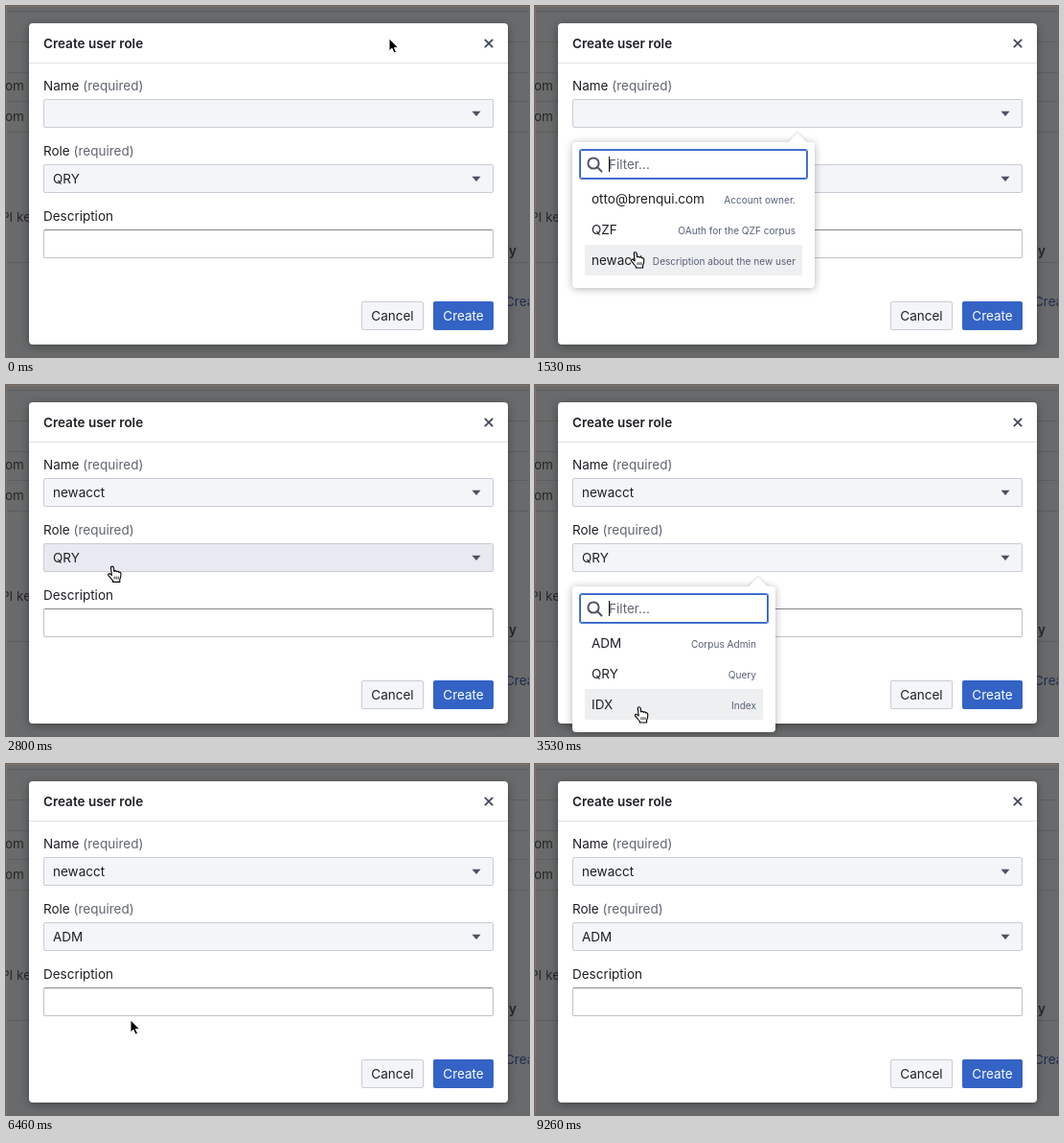
Animation of 546x366 px, one loop 9.43 s. Source, as an HTML page:

```html
<!DOCTYPE html>
<html lang="en">
<head>
<meta charset="utf-8">
<title>Create user role</title>
<style>
  html, body { margin: 0; width: 100%; height: 100%; overflow: hidden; }
  body { position: relative; background: #696a6b; font: 13.5px Inter, "Liberation Sans", sans-serif; color: #1d1f24; cursor: default; }
  div { position: absolute; box-sizing: border-box; white-space: nowrap; }
  svg { position: absolute; overflow: visible; }
  .rule { left: 0; width: 546px; height: 1px; background: #5d5e60; }
  .edge { background: #86705f; }
  .back { color: #26272a; }
  .link { color: #1c2c54; }
  .modal { background: #fff; border-radius: 4px; box-shadow: 0 2px 10px rgba(0,0,0,.35); }
  .line { background: #dfe1e6; }
  .bold { font-weight: 600; }
  .soft { color: #5f6470; }
  .select, .cancel { background: #f3f5f8; border: 1px solid #c8ccd5; border-radius: 2px; }
  .select { padding-left: 9px; }
  .select.hover, .cancel.hover { background: #e9eaf1; }
  .input { background: #fff; border: 1px solid #bfc1c5; border-top-color: #85878b; border-radius: 2px; }
  .cancel, .create { text-align: center; border-radius: 2px; }
  .create { background: #3463c6; color: #fff; }
  .create.hover { background: #2b4fa2; }
  .popup { background: #fff; border-radius: 4px; box-shadow: 0 1px 9px rgba(0,0,0,.3); }
  .tip { width: 14px; height: 14px; background: #fff; transform: rotate(45deg); box-shadow: -1px -1px 2px rgba(0,0,0,.13); }
  .cover { background: #fff; }
  .filter { border: 1px solid #bfc3cc; border-radius: 2px; padding-left: 29px; color: #62666f; }
  .filter.focus { border-color: #3564c8; box-shadow: 0 0 0 1px #4c78d4; }
  .caret { background: #111; }
  .row { padding-left: 7px; border-radius: 1px; }
  .row.hover { background: #eeeff1; }
  .note { right: 7px; top: 1px; font-size: 10.1px; color: #566079; }
</style>
</head>
<body>
<script>
const LOOP = 9430;
const NAME = 'newacct';

function box(parent, cls, x, y, w, h, text = '') {
  const el = document.createElement('div');
  el.className = cls;
  el.style.cssText = `left:${x}px;top:${y}px;width:${w}px;height:${h}px;line-height:${h}px`;
  el.textContent = text;
  parent.append(el);
  return el;
}

// Text centred vertically on cy
const label = (parent, cls, x, cy, text) => box(parent, cls, x, cy - 10, 200, 20, text);

function svg(parent, x, y, inner) {
  const el = document.createElementNS('http://www.w3.org/2000/svg', 'svg');
  el.setAttribute('width', 20);
  el.setAttribute('height', 20);
  el.style.left = x + 'px';
  el.style.top = y + 'px';
  el.innerHTML = inner;
  parent.append(el);
  return el;
}

const page = document.body;

// Dimmed page behind the dialog
for (const y of [5, 37, 69, 99, 131, 267]) box(page, 'rule', 0, y, 546, 1);
box(page, 'edge', 0, 0, 546, 1);
box(page, 'edge', 0, 0, 1, 366);
label(page, 'back', -1, 83, 'om');
label(page, 'back', -1, 115, 'om');
label(page, 'back', -5, 220, 'PI key');
label(page, 'back bold', 525, 255, 'y');
label(page, 'back link', 521, 308, 'Create');

// Dialog
box(page, 'modal', 24, 18, 500, 335);
box(page, 'line', 24, 59, 500, 1);
label(page, 'bold', 39, 39, 'Create user role');
svg(page, 504, 39, '<path d="M-4.2-4.2 4.2 4.2M4.2-4.2-4.2 4.2" stroke="#3c4456" stroke-width="1.7"/>');

function field(cy, text) {
  const el = label(page, '', 39, cy, text + ' ');
  const req = document.createElement('span');
  req.className = 'soft';
  req.textContent = '(required)';
  el.append(req);
  const control = box(page, 'select', 39, cy + 14, 470, 30);
  control.style.lineHeight = '28px';
  svg(page, 491, cy + 29, '<path d="M-4.5-2.3H4.5L0 2.9Z" fill="#4b5160"/>');
  return control;
}
const nameBox = field(83, 'Name');
const roleBox = field(151, 'Role');
label(page, '', 39, 219, 'Description');
box(page, 'input', 39, 233, 470, 30);
const cancel = box(page, 'cancel', 371, 308, 65, 30, 'Cancel');
cancel.style.lineHeight = '28px';
const create = box(page, 'create', 446, 308, 63, 30, 'Create');

function popup(y, w, items) {
  const el = box(page, 'popup', 39, y, w, 152);
  box(el, 'tip', w - 25, -7, 14, 14);
  box(el, 'cover', w - 32, 0, 28, 14);
  const filter = box(el, 'filter focus', 8, 8, w - 16, 30, 'Filter...');
  filter.style.lineHeight = '28px';
  svg(el, 22, 22, '<g fill="none" stroke="#4d5464" stroke-width="2"><circle r="5.6"/><path d="M4 4 8.5 8.5" stroke-linecap="round"/></g>');
  const caret = box(el, 'caret', 38, 15, 1, 16);
  const rows = items.map(([text, note], i) => {
    const row = box(el, 'row', 13, 43 + 32 * i, w - 26, 32, text);
    const n = document.createElement('div');
    n.className = 'note';
    n.textContent = note;
    row.append(n);
    return row;
  });
  return { el, filter, caret, rows, y, w };
}
const names = popup(142, 253, [
  ['otto@brenqui.com', 'Account owner.'],
  ['QZF', 'OAuth for the QZF corpus'],
  [NAME, 'Description about the new user'],
]);
const roles = popup(210, 212, [['ADM', 'Corpus Admin'], ['QRY', 'Query'], ['IDX', 'Index']]);

// Pointers, with the hot spot at 0,0
const ink = 'stroke-linejoin="round" stroke-linecap="round"';
const arrow = svg(page, 0, 0,
  `<path d="M0 0V13L3 10.2 5.1 15 7.5 14 5.4 9.4H9.4Z" fill="#000" stroke="#fff" stroke-width="1" ${ink}/>`);
const hand = svg(page, 0, 0,
  `<path d="M-1.7 1C-1.7-.7 1-.7 1.2 1L1.7 5C2.2 3.9 4 4 4.2 5.3 4.8 4.4 6.4 4.7 6.6 6 7.4 5.4 8.8 5.9 8.8 7.4
  C8.9 10 8.6 11.4 7.6 13.4V16H.4V14.6C-1.3 13-2.6 10.8-4.2 9.2-5.3 7.8-3.6 6.6-2.2 7.8L-.8 9Z"
  fill="#fff" stroke="#000" stroke-width="1.1" ${ink}/><path d="M2 10.2V13.2M4 10.2V13.2M6 10.2V13.2" stroke="#000" stroke-width=".8"/>`);

// time, x, y
const path = [
  [0, 400, 34], [30, 400, 34], [930, 190, 114], [1060, 190, 114],
  [1500, 105, 257], [1760, 105, 257], [1930, 106, 262], [2030, 106, 262],
  [2750, 111, 190], [2930, 112, 187], [3030, 112, 187], [3500, 109, 336],
  [3760, 109, 337], [3960, 109, 337], [4400, 112, 302], [4900, 118, 270],
  [5060, 118, 270], [5230, 131, 247], [5660, 130, 267], [6860, 130, 267],
  [7460, 472, 308.5], [7730, 475, 317], [7830, 475, 317], [8160, 476, 321], [LOOP, 476, 321],
];

function pointer(t) {
  const i = path.findIndex(p => p[0] > t);
  const [t0, x0, y0] = path[i - 1], [t1, x1, y1] = path[i];
  const u = (t - t0) / (t1 - t0), k = u * u * (3 - 2 * u);
  return [x0 + (x1 - x0) * k, y0 + (y1 - y0) * k];
}

const within = (t, a, b) => t >= a && t < b;

function draw(t) {
  const [x, y] = pointer(t);
  const shown = t < 9100;
  const open = within(t, 1030, 1930) ? names : within(t, 3000, 6460) ? roles : null;
  const over = (l, top, w, h) => shown && within(x, l, l + w) && within(y, top, top + h);
  const inPopup = open && over(39, open.y, open.w, 152);
  let active = false;
  const hover = (el, on) => {
    el.classList.toggle('hover', !!on);
    active = active || on;
  };

  nameBox.textContent = t < 1930 ? '' : NAME;
  roleBox.textContent = t < 6460 ? 'QRY' : 'ADM';
  hover(nameBox, !inPopup && over(39, 97, 470, 30));
  hover(roleBox, !inPopup && over(39, 165, 470, 30));
  hover(cancel, !inPopup && over(371, 308, 65, 30));
  hover(create, !inPopup && over(446, 308, 63, 30));

  for (const p of [names, roles]) {
    p.el.style.display = p === open ? 'block' : 'none';
    p.rows.forEach((row, i) => hover(row, p === open && over(52, p.y + 43 + 32 * i, p.w - 26, 32)));
  }
  // Pressing a row takes the focus from the filter
  const focus = t < 5830;
  roles.filter.classList.toggle('focus', focus);
  roles.caret.style.display = focus ? 'block' : 'none';

  arrow.style.display = shown && !active ? 'block' : 'none';
  hand.style.display = shown && active ? 'block' : 'none';
  arrow.style.transform = hand.style.transform = `translate(${x}px,${y}px)`;
}

const start = performance.now();
function tick() {
  draw((performance.now() - start) % LOOP);
  requestAnimationFrame(tick);
}
tick();
</script>
</body>
</html>
```
